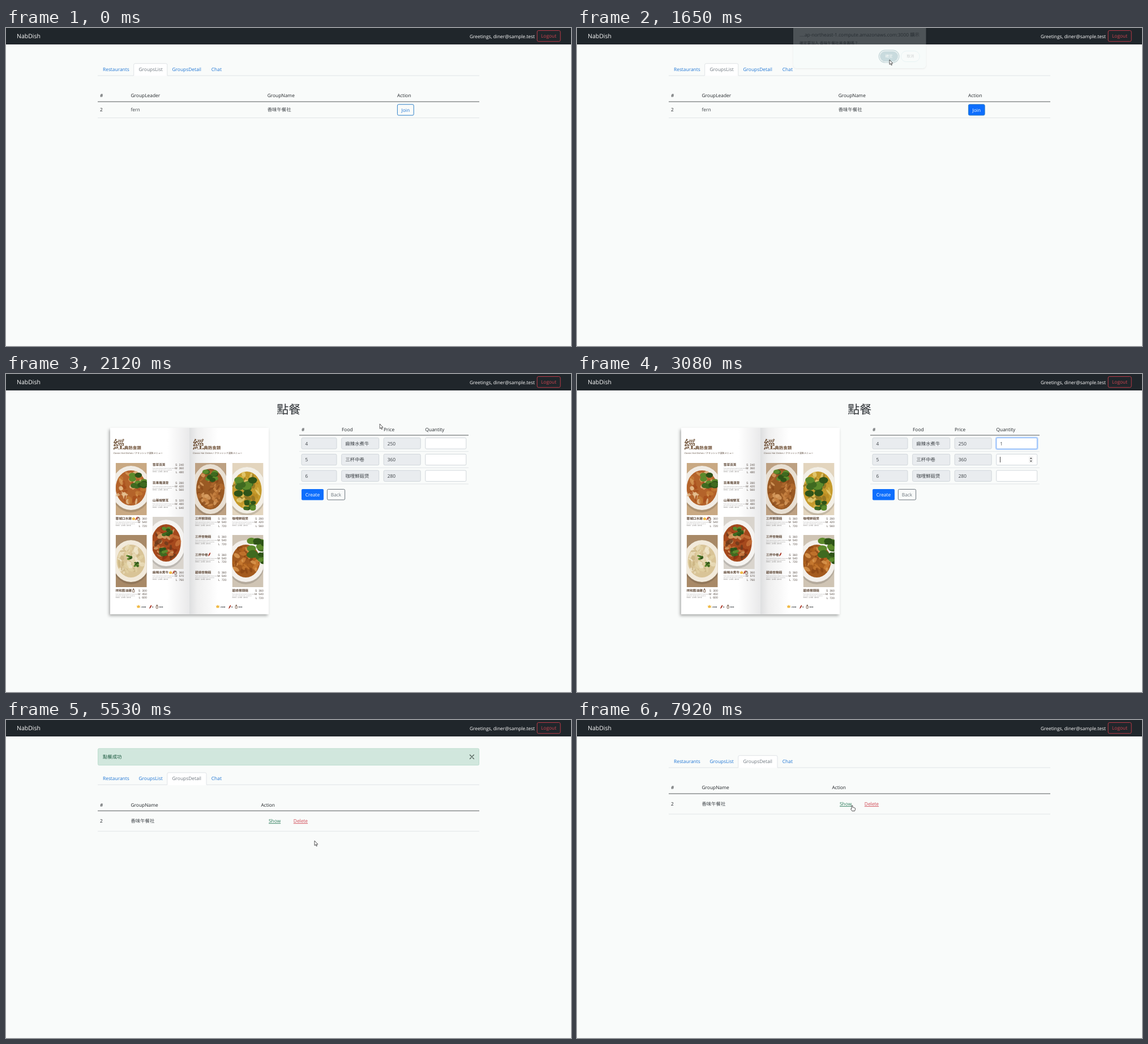
Write an HTML page that moves like this. It is 998x561 px and loops after 7990 ms.

```html
<!DOCTYPE html>
<html lang="zh-Hant">
<head>
<meta charset="utf-8">
<title>Group order</title>
<style>
html, body { margin: 0; width: 100%; height: 100%; overflow: hidden; background: #f9fbfa; }
svg { display: block; }
text {
  font: 8.38px "Open Sans", "Noto Sans CJK TC", "Noto Sans CJK", sans-serif;
  fill: #3c4146; text-rendering: geometricPrecision; white-space: pre;
}
.mid { text-anchor: middle; }
.end { text-anchor: end; }
.white { fill: #fff; }
.dark { fill: #212529; }
.brand { font-size: 10.5px; fill: #fff; }
.link { fill: #1d74d4; }
.gray { fill: #6c757d; }
.red { fill: #cf4450; }
.green { fill: #287a58; }
.u { text-decoration: underline; }
.title { font-size: 21px; fill: #2b2f33; }
.ok { fill: #1d5a40; }
.small { font-size: 6.8px; }
.btn { font-size: 6.6px; }
.big { font: 700 21px "Noto Serif CJK TC", "Noto Serif", "Noto Sans CJK TC", serif; fill: #6f5137; }
.sub { font-size: 7.5px; font-weight: 700; fill: #6f5137; }
.tag { font-size: 4.1px; fill: #59483a; }
.dish { font-size: 5.7px; font-weight: 700; fill: #5d4634; }
.cost { font: 5.2px "Liberation Sans", sans-serif; fill: #5b5048; }
.fine { font-size: 1.95px; fill: #6a6663; }
.mini { font-size: 2.3px; font-weight: 700; }
.cur { fill: #fff; stroke: #111; stroke-width: .7; stroke-linejoin: round; }
#book { filter: drop-shadow(-2px 3px 2.5px rgba(0, 0, 0, .32)); }
#dialog { filter: drop-shadow(0 1px 1.5px rgba(0, 0, 0, .35)); }
</style>
</head>
<body>
<svg id="stage" width="998" height="561" viewBox="0 0 998 561"></svg>
<script>
const LOOP = 7990;
const GROUP = '香味午餐社';

const text = (x, y, s, cls = '') => `<text x="${x}" y="${y}" class="${cls}">${s}</text>`;
const rect = (x, y, w, h, fill, stroke = 'none', r = 0, more = '') =>
  `<rect x="${x}" y="${y}" width="${w}" height="${h}" rx="${r}" fill="${fill}" stroke="${stroke}" ${more}/>`;
const rule = (x1, x2, y, color) => `<path d="M${x1} ${y}H${x2}" stroke="${color}"/>`;
const oval = (cx, cy, rx, ry, fill, more = '') =>
  `<ellipse cx="${cx}" cy="${cy}" rx="${rx}" ry="${ry}" fill="${fill}" ${more}/>`;
const group = (id, body, more = '') => `<g id="${id}" ${more}>${body}</g>`;

function seeded(seed) {
  return () => (seed = (seed * 16807) % 2147483647) / 2147483647;
}

// Page chrome

const navbar = rect(0, 0, 998, 29, '#20262b') +
  text(19, 18.2, 'NabDish', 'brand') +
  text(934, 17.6, 'Greetings, diner@sample.test', 'white end') +
  rect(938.2, 4.5, 41, 19.2, 'none', '#b83a47', 2.5) +
  text(958.6, 17.4, 'Logout', 'red mid');

function tabs(active) {
  const names = ['Restaurants', 'GroupsList', 'GroupsDetail', 'Chat'];
  const xs = [171, 234.5, 293.5, 362.8];
  const [l, r] = active === 1 ? [225.7, 284.8] : [284.8, 354];
  return rule(162, 836, 84, '#dfe3e6') +
    `<path d="M${l} 84.8V65q0-2.3 2.3-2.3H${r - 2.3}q2.3 0 2.3 2.3V84.8" fill="#fff"/>` +
    `<path d="M${l} 84V65q0-2.3 2.3-2.3H${r - 2.3}q2.3 0 2.3 2.3V84" fill="none" stroke="#dfe3e6"/>` +
    names.map((n, i) => text(xs[i], 76, n, i === active ? 'gray' : 'link')).join('');
}

function tableHead(cols) {
  return cols.map(([x, s]) => text(x, 122.4, s, 'dark')).join('') + rule(162, 836, 130, '#54585b');
}

const list = tabs(1) +
  tableHead([[166, '#'], [220.5, 'GroupLeader'], [461.7, 'GroupName'], [691, 'Action']]) +
  text(166, 147.4, '2', 'dark') + text(220.5, 147.4, 'fern') + text(461.7, 147.4, GROUP) +
  rule(162, 836, 158.5, '#e1e5e7') +
  rect(691.4, 134.8, 28.8, 19.2, 'none', '#2f80c8', 2.2, 'id="join"') +
  '<text id="joinText" x="705.8" y="147.6" class="mid">Join</text>';

const alertBox = rect(162.5, 50.3, 673, 29.4, '#d1e7dd', '#bcdccd', 2) +
  text(171, 68, '點餐成功', 'ok') +
  '<path d="M819.4 61.5l7 7m0-7l-7 7" stroke="#4c5a54" stroke-width="1.2" stroke-linecap="round"/>';

const detail = group('alert', alertBox) + group('detailBody', tabs(2) +
  tableHead([[166, '#'], [220.5, 'GroupName'], [450.4, 'Action']]) +
  text(166, 151, '2', 'dark') + text(220.5, 151, GROUP) +
  text(464, 151, 'Show', 'green u') + text(507.8, 151, 'Delete', 'red u') +
  rule(162, 836, 166, '#e1e5e7'));

const dialog = rect(382, -10, 234.5, 81, '#f4fcfc', 'none', 6) +
  text(393, 15, '....ap-northeast-1.compute.amazonaws.com:3000 顯示') +
  text(393, 29.4, `確定要加入 ${GROUP}美食團嗎？`, 'small') +
  rect(533.3, 39.3, 35.6, 21.6, '#fff', '#1c6673', 10.8, 'stroke-width="1.4"') +
  rect(535, 41, 32.2, 18.2, '#1a6a78', 'none', 9.1) + text(551, 52.4, '確定', 'btn white mid') +
  rect(572.3, 40.7, 33, 18.8, '#f8fefe', '#a9d6dd', 9.4) + text(588.8, 52.4, '取消', 'btn mid');

// Order form

const rowY = i => 112.7 + i * 28.65;

function orderRow(i, id, food, price) {
  const y = rowY(i);
  const box = (x, w, fill) => rect(x, y, w, 19.4, fill, '#d0d6da', 2);
  return box(522, 62, '#e9ecef') + box(592.7, 66, '#e9ecef') + box(667.2, 65, '#e9ecef') +
    box(740.8, 72, '#fff') +
    text(528.6, y + 13, id) + text(599.5, y + 13, food) + text(673.7, y + 13, price) +
    rule(518, 817, y + 24, '#e1e5e7') +
    group('ring' + i, rect(739.8, y - 1, 74, 21.4, 'none', '#bdd7fd', 3, 'stroke-width="2"') +
      rect(740.8, y, 72, 19.4, 'none', '#86b7fe', 2)) +
    group('spin' + i, rect(798.3, y + 4, 7.2, 11.8, '#f1f1f1') +
      `<path d="M799.9 ${y + 8.4}l2-2.6 2 2.6zM799.9 ${y + 11.4}l2 2.6 2-2.6z" fill="#505050"/>`) +
    `<text id="qty${i}" x="747.3" y="${y + 13}"></text>`;
}

const form = text(499.3, 69.8, '點餐', 'title mid') +
  [[522, '#'], [593, 'Food'], [667, 'Price'], [740.5, 'Quantity']]
    .map(([x, s]) => text(x, 100.6, s, 'dark')).join('') +
  rule(518, 817, 108, '#54585b') +
  orderRow(0, 4, '麻辣水煮牛', 250) + orderRow(1, 5, '三杯中卷', 360) + orderRow(2, 6, '咖哩鮮菇煲', 280) +
  rect(522, 203, 39, 19.4, '#0d6efd', 'none', 2, 'id="create"') + text(541.4, 215.7, 'Create', 'white mid') +
  rect(567.4, 203.4, 31.2, 18.6, 'none', '#6c757d', 2) + text(583, 215.7, 'Back', 'gray mid');

// Printed menu

function photo(x, y, seed, bg, plate, sauce, bits, [cx, cy, rx, ry], leaves) {
  const rnd = seeded(seed);
  let s = rect(0, 0, 55, 92, bg) + oval(cx, cy + 2, rx + 9, ry + 10, '#00000022') +
    oval(cx, cy, rx + 8, ry + 8, plate) + oval(cx, cy, rx, ry, sauce);
  for (let i = 0; i < 46; i++) {
    const a = rnd() * 6.283, d = Math.sqrt(rnd()) * .88;
    const px = cx + rx * d * Math.cos(a), py = cy + ry * d * Math.sin(a);
    s += oval(px, py, 3 + rnd() * 4, 1.5 + rnd() * 2.5, bits[i % bits.length],
      `opacity=".8" transform="rotate(${rnd() * 180} ${px} ${py})"`);
  }
  for (const [lx, ly, r] of leaves) {
    for (let i = 0; i < 12; i++) {
      s += oval(lx + (rnd() - .5) * r * 1.4, ly + (rnd() - .5) * r * 1.4, r * .42, r * .3,
        ['#3f6a20', '#5c8a2c', '#2f5418'][i % 3]);
    }
  }
  return `<svg x="${x}" y="${y}" width="55" height="92">${s}</svg>`;
}

const crown = (x, y) => `<path d="M${x} ${y}l1.6 1.6 1.4-2.6 1.4 2.6 1.6-1.6-.7 4.6h-4.6z" fill="#f0b840"/>`;
const chili = (x, y) => `<path d="M${x} ${y}q1-4 3.4-6.4 1.2.6.6 2-1.4 4-4 4.4z" fill="#a8301f"/>`;
const bottle = (x, y) => rect(x, y, 3.4, 4.6, '#e8e4dc', '#6a4a38', .8, 'stroke-width=".7"') +
  rect(x + .9, y - 2, 1.6, 2, '#6a4a38');

function item(x, y, name, base, [s, m, l], marks = '') {
  const prices = [['S', s], ['M', m], ['L', l]];
  const lines = ['Fresh seasonal food cooked in house sauce', 'with herbs and light broth, served hot',
    '季節食材・当日調理・温製料理'];
  let out = text(x, y + 2.2, name, 'dish');
  prices.forEach(([k, p], i) => out += text(x + 55.3, y + 2 + i * 6.3, `${k}  ${p}`, 'cost end'));
  lines.forEach((t, i) => out += text(x, y + 7 + i * 3.1, t, 'fine'));
  const mx = x + 29;
  if (marks.includes('k')) out += crown(mx, y - 2);
  if (marks.includes('c')) out += chili(mx + (marks.includes('k') ? 6 : -6), y + 3);
  if (marks.includes('b')) out += bottle(mx + (marks.includes('k') ? 10 : 1), y - 1);
  return out;
}

const heading = x => text(x - .5, 131.5, '經', 'big') + text(x + 19.3, 132.7, '典熱食類', 'sub') +
  text(x, 140.6, 'Classic Hot Dishes / クラッシック溫製メニュー', 'tag');
const legend = x => crown(x, 408) + text(x + 7, 411.8, '人氣推薦', 'mini') +
  chili(x + 22, 414) + text(x + 27, 411.8, '辣', 'mini') +
  bottle(x + 34, 409) + text(x + 39.5, 411.8, '醬料理', 'mini');

const menu = `<defs>
  <linearGradient id="leftPage"><stop offset=".72" stop-color="#fff"/><stop offset="1" stop-color="#e9e9ea"/></linearGradient>
  <linearGradient id="rightPage"><stop offset="0" stop-color="#dedfe0"/><stop offset=".1" stop-color="#efefef"/><stop offset=".36" stop-color="#fff"/></linearGradient>
</defs>` +
  group('book', rect(184, 95, 280, 328.6, '#fff')) +
  rect(184, 95, 140, 328.6, 'url(#leftPage)') + rect(324, 95, 140, 328.6, 'url(#rightPage)') +
  heading(189.5) + heading(330) + legend(231) + legend(371) +
  photo(193.7, 157, 11, '#c9a983', '#f1ece4', '#b4632a', ['#d99a58', '#e6c294', '#a84e1c', '#c47834'], [27, 44, 27, 31], [[40, 32, 15]]) +
  photo(193.7, 284, 23, '#a88967', '#f2eadb', '#d9c497', ['#ecdfbd', '#e3d2a4', '#f2e9d0', '#cbb583'], [27, 46, 25, 29], [[24, 40, 5], [36, 52, 5]]) +
  photo(258.8, 252, 37, '#d9d4cd', '#f5f3f0', '#a5491d', ['#c8733a', '#8e3412', '#d9a56c', '#6b3a1c'], [24, 46, 26, 33], [[26, 26, 9], [18, 62, 8]]) +
  photo(334, 157, 41, '#bda183', '#e8dfd2', '#9a5a24', ['#c98443', '#b06a2e', '#dba063', '#8a4a1a'], [27, 46, 25, 36], [[27, 24, 13]]) +
  photo(399.6, 157, 59, '#e3d5be', '#f3efe6', '#c59a2c', ['#dbb84a', '#b98a22', '#e6cf78', '#8f7424'], [26, 48, 26, 33], [[24, 42, 19], [32, 74, 11]]) +
  photo(399.6, 284, 73, '#cfc4b4', '#f3efea', '#a35a1e', ['#c97a30', '#b3641f', '#dc9950', '#8c4613'], [24, 46, 25, 29], [[46, 22, 19], [50, 40, 12]]) +
  item(258.8, 160, '雪菜百頁', 0, [240, 360, 480]) +
  item(258.8, 191.5, '百果羅漢齋', 0, [280, 420, 560]) +
  item(258.8, 223, '山藥燴雙耳', 0, [320, 480, 640]) +
  item(193.5, 255, '蓉城口水雞', 0, [360, 540, 720], 'kcb') +
  item(258.8, 350, '麻辣水煮牛', 0, [360, 570, 760], 'kcb') +
  item(193.5, 381.5, '祥和醬油雞', 0, [300, 450, 600], 'b') +
  item(334, 255, '三杯猴頭菇', 0, [360, 540, 720]) +
  item(334, 287, '三杯杏鮑菇', 0, [360, 540, 720]) +
  item(334, 318.5, '三杯中卷', 0, [360, 540, 720], 'c') +
  item(334, 350, '碧綠杏鮑菇', 0, [360, 540, 720]) +
  item(399.6, 255, '咖哩鮮菇煲', 0, [280, 420, 560]) +
  item(399.6, 382, '碧綠猴頭菇', 0, [360, 540, 720]);

const cursors =
  '<path id="arrow" class="cur" d="M0 0V8.4L1.9 6.7 3.2 9.7 4.5 9.1 3.2 6.2H5.8Z"/>' +
  '<path id="hand" class="cur" d="M-1 .6Q0-.6 .9 .6V3.6Q2 3 2.6 4 3.6 3.5 4.2 4.5 5.2 4.3 5.4 5.3V7.6L4.5 10H-.2L-2.4 6.9Q-2.4 5.6-1 6.2Z"/>' +
  '<path id="ibeam" d="M0-5V5" stroke="#333" stroke-width=".9"/>';

const stage = document.getElementById('stage');
stage.innerHTML = rect(0, 0, 998, 561, '#f9fbfa') + group('list', list) +
  group('order', group('menu', menu) + form) + group('detail', detail) +
  navbar + group('dialog', dialog) + group('cursor', cursors);

const el = {};
stage.querySelectorAll('[id]').forEach(n => el[n.id] = n);

// Pointer path: time, x, y and the pointer shape from that time on
const path = [
  [160, 91, 285, 'arrow'], [380, 330, 262, 'arrow'], [600, 600, 205, 'arrow'], [740, 743, 150, 'arrow'],
  [860, 712, 143, 'hand'], [950, 696, 146, 'hand'], [1160, 696, 146, 'arrow'], [1330, 620, 95, 'arrow'],
  [1500, 552, 56, 'arrow'], [1900, 552, 56, 'arrow'], [2100, 650, 84, 'arrow'], [2300, 747.5, 122, 'ibeam'],
  [2600, 747.5, 122, 'ibeam'], [2670, 747.5, 151, 'ibeam'], [3310, 747.5, 151, 'ibeam'],
  [3390, 747.5, 179.5, 'ibeam'], [4460, 747.5, 179.5, 'arrow'], [4620, 690, 212, 'arrow'],
  [4840, 601, 255, 'arrow'], [4980, 545, 302, 'arrow'], [5080, 514, 262, 'arrow'],
  [5200, 545, 213, 'hand'], [5450, 545, 213, 'arrow'], [6090, 545, 213, 'arrow'], [6190, 560, 226, 'arrow'],
  [6400, 430, 165, 'arrow'], [6580, 320, 107.5, 'hand'], [7150, 320, 107.5, 'arrow'],
  [7300, 320, 107.5, 'arrow'], [7500, 385, 132, 'arrow'], [7720, 460, 150, 'arrow'], [7850, 486, 150.5, 'hand'],
  [LOOP, 486, 150.5, 'hand']
];

const show = (node, on) => node.style.display = on ? '' : 'none';
const ramp = (t, from, ms) => Math.min(1, Math.max(0, (t - from) / ms));

function movePointer(t) {
  show(el.cursor, t >= path[0][0]);
  const i = path.findIndex(p => p[0] > t);
  if (i < 1) return;
  const [t0, x0, y0, shape] = path[i - 1], [t1, x1, y1] = path[i];
  const k = (t - t0) / (t1 - t0);
  el.cursor.setAttribute('transform', `translate(${x0 + (x1 - x0) * k} ${y0 + (y1 - y0) * k})`);
  for (const s of ['arrow', 'hand', 'ibeam']) show(el[s], s === shape);
}

const focusAt = [2370, 3080, 3720, 5450];
const hoverAt = [2300, 2670, 3390, 4910];
const typed = [[2600, '1'], [3250, '1'], [4210, '0']];

function draw(t) {
  show(el.list, t < 1720);
  show(el.order, t >= 1720 && t < 5450);
  show(el.detail, t >= 5450);

  const hot = ramp(t, 850, 80);
  el.join.style.fill = `rgba(13,110,253,${hot})`;
  el.joinText.style.fill = hot > .5 ? '#fff' : '#1d74d4';
  el.dialog.style.opacity = ramp(t, 1000, 100) * (1 - ramp(t, 1580, 90));

  el.menu.style.opacity = t < 1880 ? 0 : t < 1960 ? .3 : t < 2040 ? .65 : 1;
  typed.forEach(([at, value], i) => {
    el['ring' + i].style.opacity = ramp(t, focusAt[i], 150) * (1 - ramp(t, focusAt[i + 1] + 60, 130));
    show(el['spin' + i], t >= hoverAt[i] && t < hoverAt[i + 1]);
    el['qty' + i].textContent = t >= at ? value : '';
  });
  el.create.style.fill = t >= 5180 ? '#0b5ed7' : '#0d6efd';

  show(el.alert, t < 7150);
  el.detailBody.setAttribute('transform', `translate(0 ${t < 7150 ? 30.2 : 0})`);
  movePointer(t);
}

const start = performance.now();
function tick() {
  draw((performance.now() - start) % LOOP);
  requestAnimationFrame(tick);
}
tick();
</script>
</body>
</html>
```
